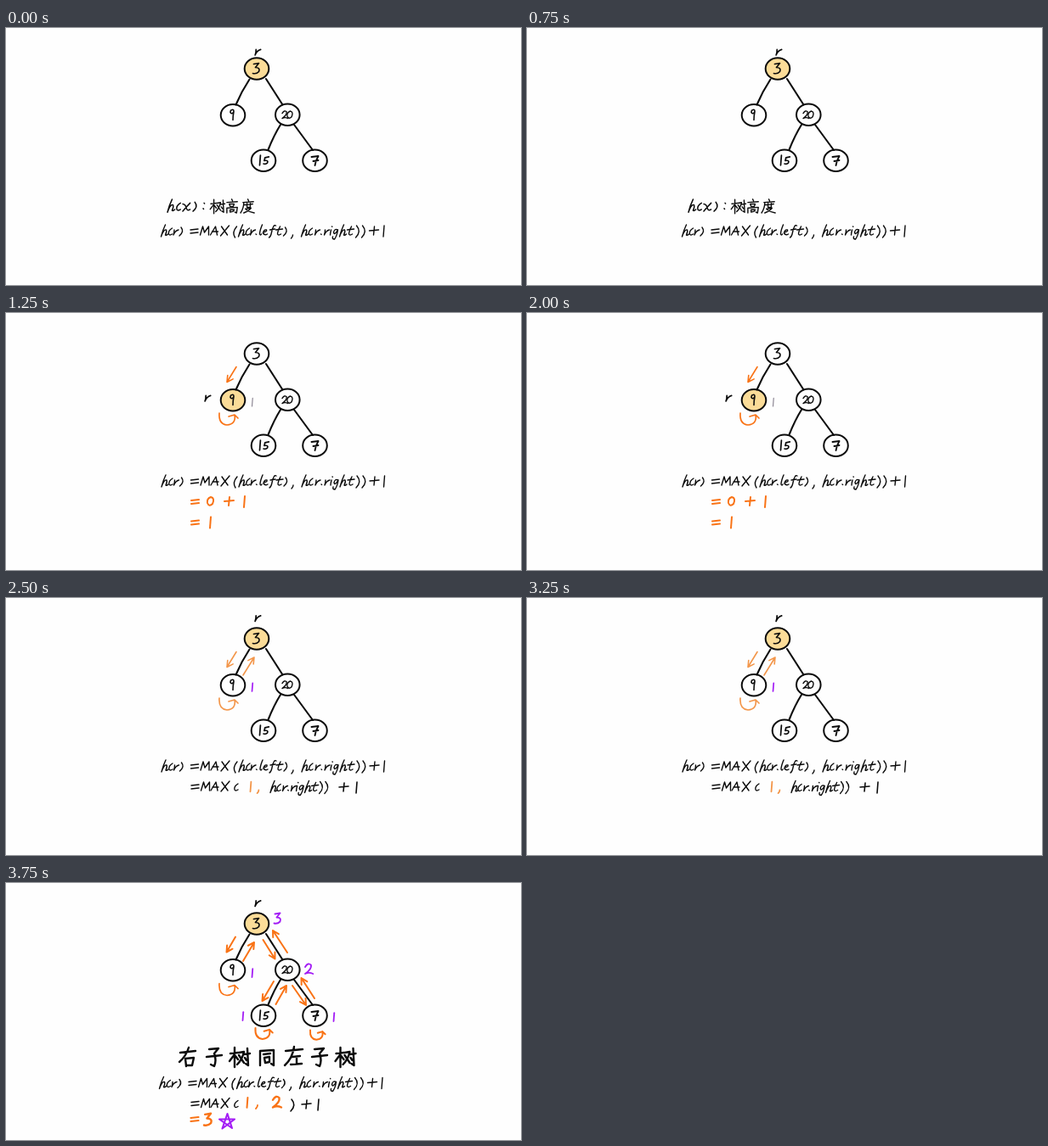
An HTML page that plays this animation: 606 by 303 pixels, repeating every 5000 ms.

```html
<!DOCTYPE html>
<html lang="zh">
<head>
<meta charset="utf-8">
<title>树高度</title>
<style>
html, body { margin: 0; width: 100%; height: 100%; overflow: hidden; background: #fefefe; }
svg { display: block; width: 100vw; height: 100vh; }
path, ellipse { stroke-linecap: round; stroke-linejoin: round; }
</style>
</head>
<body>
<svg id="stage" viewBox="0 0 606 303" fill="none" role="img" aria-label="h(r) = MAX(h(r.left), h(r.right)) + 1"></svg>
<script>
const INK = '#0b0b0b', ORANGE = '#f97316', PALE = '#f3964a', PURPLE = '#a31df5', GOLD = '#fbdc98';
const LOOP = 5000;
const stage = document.getElementById('stage');

// Pen strokes of the handwriting; origin is the left end of the baseline.
// 'c' and 'o' are the small brackets, '(' and ')' the tall ones.
const PEN = {
  h: 'M5-12Q2-6 0 2Q3-7 6-6Q7-4 5 0Q6 1 8-1',
  c: 'M4-8Q-1-5 0-1Q1 1 4-1',
  o: 'M2-9Q6-4 0 1',
  r: 'M2-6Q2-3 1 0Q3-5 7-6',
  x: 'M0-7Q3-7 4-2Q5 1 8-1M8-8Q4-4 0 1',
  '=': 'M0-6L9-7M0-2L9-3',
  M: 'M0 0L3-10L5-3L10-10L10 0',
  A: 'M0 0L6-10L8 0M2-4L9-4',
  X: 'M1-10L8 0M10-11L0 1',
  '(': 'M4-10Q-2-3 2 3',
  ')': 'M1-11Q7-4 0 3',
  '.': 'M0-1l.6 .4',
  ':': 'M1-8l.5 .6M0-2l.5 .6',
  ',': 'M1 0Q1 2-1 4',
  l: 'M3-12Q0-5 0-1Q1 1 2-1',
  e: 'M0-3Q5-4 4-6Q1-7 0-2Q2 1 5-1',
  f: 'M7-11Q4-13 2-3Q1 2-1 3M0-6L6-7',
  t: 'M5-10Q2-4 2-1Q3 1 6-1M0-6L8-7',
  i: 'M1-6Q0-2 0 0M2-10l.3 .3',
  g: 'M5-6Q1-8 0-3Q1 1 5-6Q4 1 1 5Q-2 5-1 2',
  '+': 'M0-5L11-6M6-10L5 0',
  0: 'M4-10Q-1-8 0-3Q2 2 6-2Q9-9 4-10',
  1: 'M1-11L0 2',
  2: 'M0-7Q3-12 6-9Q7-5 0 0Q4-2 8 0',
  3: 'M1-11L7-12L3-7Q9-7 7-2Q4 1 0 0',
  5: 'M2-8L1-4Q7-5 5-1Q3 1 0 0M2-8L7-9',
  7: 'M0-8L8-9Q5-4 4 2M2-3L8-4',
  9: 'M2-10Q0-10 0-7Q2-4 4-8Q4-11 2-10M4-8Q3-3 3 2',
  右: 'M1-16L19-18M11-22Q8-12 0-5M7-9L8 0M7-9L17-10L15-1L8-1',
  子: 'M4-20L15-21L10-15Q13-7 10 0L6-2M1-11L19-13',
  树: 'M0-15L9-16M5-22L5 1M5-14L-1-6M6-12L9-8M10-16L16-17Q14-8 8-2M10-13L16-4M16-14L23-15M20-21L21-1L18-3M17-10L19-7',
  同: 'M0-18L0-1M0-18L16-19L16-1L13-3M4-14L12-15M5-10L6-4L11-5L11-11Z',
  左: 'M1-18L21-20M11-23Q9-9 0-1M9-11L18-12M14-11L14-3M7-2L20-3',
  高: 'M8-17L9-15M2-13L15-14M5-11L6-8L10-8L11-11ZM2 0L2-6L15-7L14 0L12-1M6-4L6-1L10-2L11-4Z',
  度: 'M9-17L10-15M3-13L16-14M4-13Q4-6 0 0M5-10L15-11M8-12L8-7L12-7L12-12M6-5L13-6Q10-2 4 0M7-4Q11-1 17 0'
};

function add(parent, tag, attrs) {
  const el = document.createElementNS('http://www.w3.org/2000/svg', tag);
  for (const k in attrs) el.setAttribute(k, attrs[k]);
  return parent.appendChild(el);
}

function line(g, d, color = INK, w = 1.8) {
  return add(g, 'path', { d, stroke: color, 'stroke-width': w });
}

function write(g, text, xs, y, color = INK, w = 1.4, s = 1) {
  [...text].forEach((ch, i) => {
    line(g, PEN[ch], color, w / s).setAttribute('transform', `translate(${xs[i]} ${y}) scale(${s})`);
  });
}

function arrow(g, x, y, tx, ty, color, w = 1.6) {
  const a = Math.atan2(ty - y, tx - x);
  const barb = t => `${tx - 8 * Math.cos(a + t)} ${ty - 8 * Math.sin(a + t)}`;
  line(g, `M${x} ${y}L${tx} ${ty}M${barb(.55)}L${tx} ${ty}L${barb(-.45)}`, color, w);
}

function turn(g, x, y, color, s = 1, w = 1.7) {
  line(g, 'M0 0Q-1 13 9 14Q20 13 18 2M11 4L18 2L22 6', color, w / s)
    .setAttribute('transform', `translate(${x} ${y}) scale(${s})`);
}

function glow(g, x, y) {
  add(g, 'ellipse', { cx: x, cy: y, rx: 14, ry: 12.6, fill: GOLD });
}

const RIGHT = [348, 357, 363, 371, 374, 382, 386, 393, 402, 412, 419];
const rule = [183, 192, 196.5, 204.5, 217.5, 229, 241, 253, 268, 274, 283, 287, 294.5, 299, 303, 311, 318, 327, 337,
  ...RIGHT, 428, 444.5];
const MAXIM = [218, 229.5, 241, 253, 269];

function formula(g, dx, y) {
  write(g, 'hcro=MAX(hcr.lefto,hcr.right))+1', rule.map(x => x + dx), y);
}

const scenes = [0, 1, 2, 3].map(() => add(stage, 'g', {}));
const [intro, leaf, back, whole] = scenes;

// Shared tree
const tree = add(stage, 'g', {});
for (const [x, y] of [[295, 48], [267, 102.7], [331.3, 102.3], [303, 156.3], [363.5, 156.3]])
  add(tree, 'ellipse', { cx: x, cy: y, rx: 14.3, ry: 12.7, stroke: INK, 'stroke-width': 2 });
line(tree, 'M286.5 60.5Q277 75 270.5 90.5M306 60L325.5 90.5M323 114Q315 127 308.5 143.5M339 114L361 144', INK, 2.1);
write(tree, '3', [290.5], 53.5, INK, 1.7);
write(tree, '9', [264], 106.5, INK, 1.6);
write(tree, '20', [325, 331], 106.5, INK, 1.4, .85);
write(tree, '15', [298.5, 303], 160, INK, 1.7, .9);
write(tree, '7', [359.5], 160, INK, 1.9);

// Rule stated
glow(intro, 295, 48);
write(intro, 'r', [292], 32, INK, 1.6, 1.1);
write(intro, 'hcxo:', [190, 201, 208, 220, 232], 215, INK, 1.5, 1.08);
write(intro, '树', [241], 218, INK, 1.4, .72);
write(intro, '高度', [258, 276], 218, INK, 1.4, .95);
formula(intro, -.5, 244);

// Left leaf
glow(leaf, 267, 102.7);
write(leaf, 'r', [233], 104, INK, 1.7, 1.1);
arrow(leaf, 271, 63.5, 260, 81.5, ORANGE);
turn(leaf, 251, 118, ORANGE);
write(leaf, '1', [289.5], 108.5, '#8d8794', 1.2, .75);
formula(leaf, 0, 203);
write(leaf, '=0+1', [218, 237, 257, 280], 227, ORANGE, 2);
write(leaf, '=1', [218, 240], 251.5, ORANGE, 2);

// Back at the root
glow(back, 295, 48);
write(back, 'r', [292], 27.5, INK, 1.7, 1.1);
arrow(back, 271, 63.5, 260, 81.5, PALE);
turn(back, 251, 118, PALE);
arrow(back, 279, 91, 292, 70, PALE);
write(back, '1', [289.5], 108.5, PURPLE, 1.7, .75);
formula(back, 0, 203);
write(back, '=MAXc', MAXIM, 227);
write(back, '1,', [287.5, 296.5], 226.5, PALE, 1.8, .9);
write(back, 'hcr.right))', RIGHT.map(x => 311 + (x - 348) * .9), 227.5);
write(back, '+1', [392, 412], 228, INK, 1.6);

// All subtrees done
glow(whole, 295, 48);
write(whole, 'r', [292], 27.5, INK, 1.7, 1.1);
for (const a of [[270, 63.5, 259.5, 81.5], [279, 92, 292, 70], [302.5, 67, 316.5, 89.5], [331, 82, 314, 56],
  [315, 116, 301.5, 139], [317.5, 143, 330, 121], [337, 121, 353, 144], [363, 136, 347.5, 112]])
  arrow(whole, ...a, ORANGE, 2);
turn(whole, 251, 118.5, ORANGE);
turn(whole, 293.5, 171, ORANGE, .92, 2);
turn(whole, 358, 173.5, ORANGE, .8, 2);
write(whole, '3', [315.5], 47.5, PURPLE, 1.9);
write(whole, '2', [352], 107, PURPLE, 1.9, 1.15);
for (const [x, y] of [[289.5, 109.5], [278.5, 160.5], [385.5, 161.5]])
  write(whole, '1', [x], y, PURPLE, 1.8, .75);
write(whole, '右子树同左子树', [204, 235, 264, 299, 328, 359, 388.5], 216, INK, 2.4);
formula(whole, -2.5, 240.5);
write(whole, '=MAXc', MAXIM, 264.5);
write(whole, '1', [283.5], 263, ORANGE, 2, .9);
write(whole, ',', [295], 262, ORANGE, 1.8);
write(whole, '2', [314], 264.5, ORANGE, 2.4, 1.25);
write(whole, ')+1', [335, 348, 367], 266, INK, 1.6);
write(whole, '=', [217.5], 283, ORANGE, 2.2);
write(whole, '3', [233], 285.5, ORANGE, 2.4, 1.15);
line(whole, 'M254.5 289.5L260.5 272L266 289L251 278.5L269 278.5Z', PURPLE, 2.1);

scenes.forEach((g, n) => g.animate(
  [0, .25, .5, .75, 1].map(offset => ({ offset, opacity: offset === n / 4 ? 1 : 0, easing: 'step-end' })),
  { duration: LOOP, iterations: Infinity }
));
</script>
</body>
</html>
```
